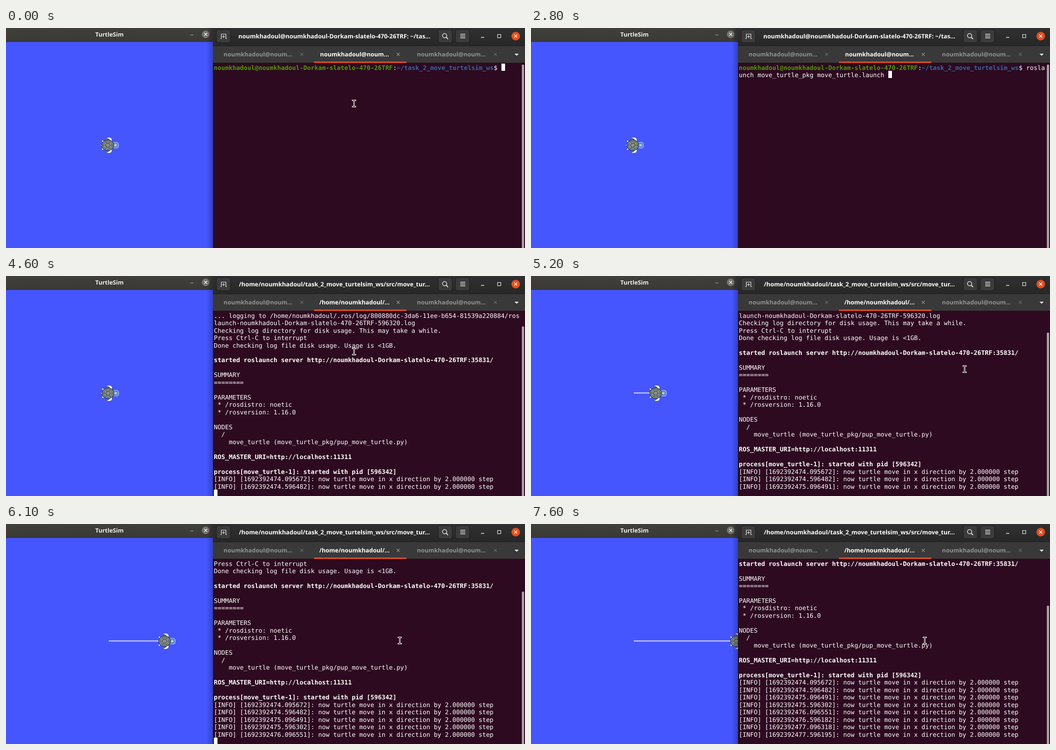
An HTML page with a canvas for the animation above (8000 ms loop, 1146x488 px).

```html
<!DOCTYPE html>
<html lang="en">
<head>
<meta charset="utf-8">
<title>TurtleSim</title>
<style>
html, body { margin: 0; width: 100%; height: 100%; overflow: hidden; background: #2d0a20; }
canvas { display: block; }
</style>
</head>
<body>
<canvas id="stage" width="1146" height="488"></canvas>
<script>
const ctx = document.getElementById('stage').getContext('2d');
const W = 1146, H = 488, LOOP = 8000, SPLIT = 457;
const MONO = '13.687px "DejaVu Sans Mono", monospace';
const UI = '"Noto Sans", "Open Sans", sans-serif';
const COL = 8.24, ROW = 16.478, LEFT = 459, TOP = 79;

const user = 'noumkhadoul';
const host = user + '-Dorkam-slatelo-470-26TRF';
const path = '~/task_2_move_turtelsim_ws';

const stamps = ['4.095672', '4.596482', '5.096491', '5.596302', '6.096551', '6.596182', '7.096318', '7.596195'];
const plain = text => ({ text, heavy: false });
const strong = text => ({ text, heavy: true });
const lines = [
  plain(''),
  plain('unch move_turtle_pkg move_turtle.launch'),
  plain(`... logging to /home/${user}/.ros/log/800880dc-3da6-11ee-b654-81539a220884/ros`),
  plain(`launch-${host}-596320.log`),
  plain('Checking log directory for disk usage. This may take a while.'),
  plain('Press Ctrl-C to interrupt'),
  plain('Done checking log file disk usage. Usage is <1GB.'),
  plain(''),
  strong(`started roslaunch server http://${host}:35831/`),
  plain(''),
  plain('SUMMARY'),
  plain('========'),
  plain(''),
  plain('PARAMETERS'),
  plain(' * /rosdistro: noetic'),
  plain(' * /rosversion: 1.16.0'),
  plain(''),
  plain('NODES'),
  plain('  /'),
  plain('    move_turtle (move_turtle_pkg/pup_move_turtle.py)'),
  plain(''),
  strong('ROS_MASTER_URI=http://localhost:11311'),
  plain(''),
  strong('process[move_turtle-1]: started with pid [596342]'),
  ...stamps.map(s => plain(`[INFO] [169239247${s}]: now turtle move in x direction by 2.000000 step`))
];

// Times at which the text cursor flips; it starts visible.
const blinks = [500, 1000, 2200, 2800, 3800, 4400, 5000, 5600, 6200, 6800, 7400];

function rect(x, y, w, h, color) {
  ctx.fillStyle = color;
  ctx.fillRect(x, y, w, h);
}

function fade(x0, y0, x1, y1, from, to) {
  const g = ctx.createLinearGradient(x0, y0, x1, y1);
  g.addColorStop(0, from);
  g.addColorStop(1, to);
  return g;
}

function stroke(points, color, width = 1) {
  ctx.strokeStyle = color;
  ctx.lineWidth = width;
  ctx.beginPath();
  points.forEach(([x, y], i) => i ? ctx.lineTo(x, y) : ctx.moveTo(x, y));
  ctx.stroke();
}

function oval(x, y, rx, ry, fill, edge, width = 1, turn = 0) {
  ctx.beginPath();
  ctx.ellipse(x, y, rx, ry, turn, 0, Math.PI * 2);
  if (fill) { ctx.fillStyle = fill; ctx.fill(); }
  if (edge) { ctx.strokeStyle = edge; ctx.lineWidth = width; ctx.stroke(); }
}

function cross(x, y, r, color, width = 1.3) {
  stroke([[x - r, y - r], [x + r, y + r]], color, width);
  stroke([[x + r, y - r], [x - r, y + r]], color, width);
}

function label(s, x, y, color, size = 13) {
  ctx.font = `bold ${size}px ${UI}`;
  ctx.textAlign = 'center';
  ctx.fillStyle = color;
  ctx.fillText(s, x, y);
}

function term(s, col, row, color = '#fff', heavy = false) {
  ctx.font = (heavy ? 'bold ' : '') + MONO;
  ctx.textAlign = 'left';
  ctx.fillStyle = color;
  ctx.fillText(s, LEFT + col * COL, Math.round(92.6 + row * ROW));
}

function flipper(side) {
  ctx.beginPath();
  ctx.moveTo(1, side * 9);
  ctx.quadraticCurveTo(2, side * 14, -8, side * 16.5);
  ctx.quadraticCurveTo(2, side * 20, 5.5, side * 14);
  ctx.quadraticCurveTo(6.5, side * 11, 5, side * 8);
  ctx.closePath();
  ctx.fillStyle = '#f4f6f4';
  ctx.fill();
  ctx.strokeStyle = '#3c4a58';
  ctx.lineWidth = 0.8;
  ctx.stroke();
  oval(-14, side * 8, 4, 1.9, '#e6eae8', '#3c4a58', 0.8, side * -0.75);
}

function turtle(x) {
  ctx.save();
  ctx.translate(x, 260);
  flipper(-1);
  flipper(1);
  stroke([[-13, 0], [-19, 0]], '#dfe5e5', 1.5);
  ctx.beginPath();
  ctx.roundRect(7, -6.5, 13, 13, 4.5);
  ctx.fillStyle = '#6488dc';
  ctx.fill();
  ctx.strokeStyle = '#a9c3f4';
  ctx.lineWidth = 1.2;
  ctx.stroke();
  oval(13, 0, 3.6, 3.2, '#cfe0ee', '#46649c', 0.8);
  rect(12, -2, 1.2, 1.2, '#33435c');
  rect(12, 1, 1.2, 1.2, '#33435c');
  oval(-3.5, 0, 12.8, 11.6, '#87928f', '#2f3a3d', 1.5);
  oval(-3.5, 0, 9.6, 8.4, null, '#485453');
  const hex = Array.from({ length: 7 }, (_, i) =>
    [-3.5 + 5 * Math.cos(i * Math.PI / 3), 5 * Math.sin(i * Math.PI / 3)]);
  stroke(hex, '#3c4746', 1.1);
  for (let i = 0; i < 6; i++) {
    const c = Math.cos(i * Math.PI / 3), s = Math.sin(i * Math.PI / 3);
    stroke([[-3.5 + 5 * c, 5 * s], [-3.5 + 12 * c, 11 * s]], '#485453');
  }
  ctx.restore();
}

function simWindow(t) {
  rect(0, 31, SPLIT, H - 31, '#4556ff');
  const x0 = 228.3;
  const x = t < 4600 ? x0 : Math.min(SPLIT, x0 + 0.5 + (t - 4600) * 0.0832);
  ctx.save();
  ctx.beginPath();
  ctx.rect(0, 31, SPLIT, H - 31);
  ctx.clip();
  if (x > x0) rect(227, 258, x - 227, 3, '#b3b8ff');
  turtle(x);
  ctx.restore();

  rect(0, 0, SPLIT, 31, fade(0, 0, 0, 31, '#403f3c', '#3a3936'));
  label('TurtleSim', 228.5, 19, '#f0efec');
  rect(407, 15, 7, 1, '#b5b4b0');
  oval(441, 14, 8.5, 8.5, '#757470');
  cross(441, 14, 3, '#fff');
  rect(443, 0, 14, H, fade(443, 0, SPLIT, 0, 'rgba(0,0,0,0)', 'rgba(0,0,0,.25)'));
}

function button(x) {
  ctx.beginPath();
  ctx.roundRect(x + 0.5, 3.5, 31, 29, 5);
  ctx.fillStyle = '#3b3b3b';
  ctx.fill();
  ctx.strokeStyle = '#1c1c1c';
  ctx.lineWidth = 1;
  ctx.stroke();
}

function chrome(running) {
  rect(SPLIT, 0, W - SPLIT, 40, fade(0, 0, 0, 40, '#303030', '#272727'));
  rect(SPLIT, 40, W - SPLIT, 37, '#393939');
  rect(SPLIT, 39, W - SPLIT, 1, '#1d1d1d');
  [464, 954, 992].forEach(button);

  stroke([[473, 23.5], [475.5, 23.5], [475.5, 13.5], [485.5, 13.5], [485.5, 23.5], [488, 23.5]], '#eee', 1.2);
  stroke([[480.5, 16], [480.5, 22]], '#eee', 1.2);
  stroke([[477.5, 19], [483.5, 19]], '#eee', 1.2);
  oval(968.5, 17, 4.7, 4.7, null, '#eee', 1.5);
  stroke([[972, 20.5], [976, 24.5]], '#eee', 1.8);
  [13, 17, 21].forEach(y => rect(1003, y, 11, 1.5, '#eee'));

  rect(1049, 20, 7, 1.5, '#eee');
  ctx.strokeStyle = '#eee';
  ctx.lineWidth = 1.2;
  ctx.strokeRect(1085.5, 14.5, 7, 7);
  oval(1125.5, 18, 9.5, 9.5, '#e2501f');
  cross(1125.5, 18, 3.2, '#fff');

  const title = running ? `/home/${user}/task_2_move_turtelsim_ws/src/move_tur...` : `${user}@${host}: ~/tas...`;
  label(title, 725, 23, '#fff', 13.2);

  const idle = `${user}@${user.slice(0, 4)}...`;
  label(idle, 556.5, 63, '#929292');
  label(running ? `/home/${user}/...` : idle, 769.5, 63, '#fff');
  label(idle, 983.5, 63, '#929292');
  cross(653, 58.5, 3.2, '#686868');
  cross(866, 58.5, 3.2, '#8f8f8f');
  cross(1080.5, 58.5, 3.2, '#686868');
  ctx.fillStyle = '#fff';
  ctx.beginPath();
  ctx.moveTo(1123, 57);
  ctx.lineTo(1132, 57);
  ctx.lineTo(1127.5, 61.5);
  ctx.fill();
  rect(680, 74.5, 204, 3, '#e95420');
}

function lineCount(t) {
  if (t < 1200) return 1;
  if (t < 3500) return 2;
  if (t < 3700) return 7;
  if (t < 3800) return 22;
  if (t < 4300) return 24;
  if (t < 4600) return 25;
  return 26 + Math.floor((t - 4600) / 500);
}

function caretCell(t) {
  if (t < 1200) return [77, 0];
  if (t < 3300) return [40, 1];
  if (t < 3500) return [0, 2];
  if (t < 3700) return [0, 8];
  return [0, t < 3800 ? 23 : 24];
}

function prompt(t) {
  term(`${user}@${host}`, 0, 0, '#4e9a06', true);
  term(':', 48, 0);
  term(path, 49, 0, '#3465a4', true);
  term(t < 1200 ? '$' : '$ rosla', 75, 0);
}

function terminal(t) {
  rect(SPLIT, 77, W - SPLIT, H - 77, '#2d0a20');
  const count = lineCount(t);
  const off = Math.max(0, count - 24);
  if (!off) prompt(t);
  lines.slice(off, count).forEach((l, row) => term(l.text, 0, row, '#fff', l.heavy));
  if (blinks.filter(b => b <= t).length % 2 === 0) {
    const [col, row] = caretCell(t);
    rect(Math.round(LEFT + 0.3 + col * COL), TOP + Math.round(row * ROW), 8, 16, '#fff');
  }
  const y = 81 + 413 * off / (off + 25);
  ctx.beginPath();
  ctx.roundRect(1139, y, 5, H - y + 9, 2.5);
  ctx.fillStyle = '#aaa3a6';
  ctx.fill();
  rect(SPLIT, 77, 1, H - 77, '#1c1218');
}

function beam(x, y) {
  const parts = [[[-3, -7], [3, -7]], [[0, -7], [0, 7]], [[-3, 7], [3, 7]]];
  ctx.lineCap = 'square';
  [['#fff', 3], ['#111', 1]].forEach(([color, width]) =>
    parts.forEach(p => stroke(p.map(([a, b]) => [x + 0.5 + a, y + 0.5 + b]), color, width)));
  ctx.lineCap = 'butt';
}

function glide(t, start, end, a, b) {
  const k = Math.min(1, Math.max(0, (t - start) / (end - start)));
  const e = k * k * (3 - 2 * k);
  return a.map((v, i) => Math.round(v + (b[i] - v) * e));
}

function pointer(t) {
  const rest = [768, 167], mid = [957, 206], low = [869, 258];
  if (t < 1200) beam(...rest);
  else if (t >= 4600) beam(...(t < 5200 ? glide(t, 4600, 5100, rest, mid) : glide(t, 5200, 5900, mid, low)));
}

function draw(now) {
  const t = Math.floor((now % LOOP) / 100) * 100;
  ctx.textRendering = 'geometricPrecision';
  simWindow(t);
  terminal(t);
  chrome(t >= 3500);
  pointer(t);
}

let start;
function tick(now) {
  start ??= now;
  draw(now - start);
  requestAnimationFrame(tick);
}
draw(0);
requestAnimationFrame(tick);
</script>
</body>
</html>
```
